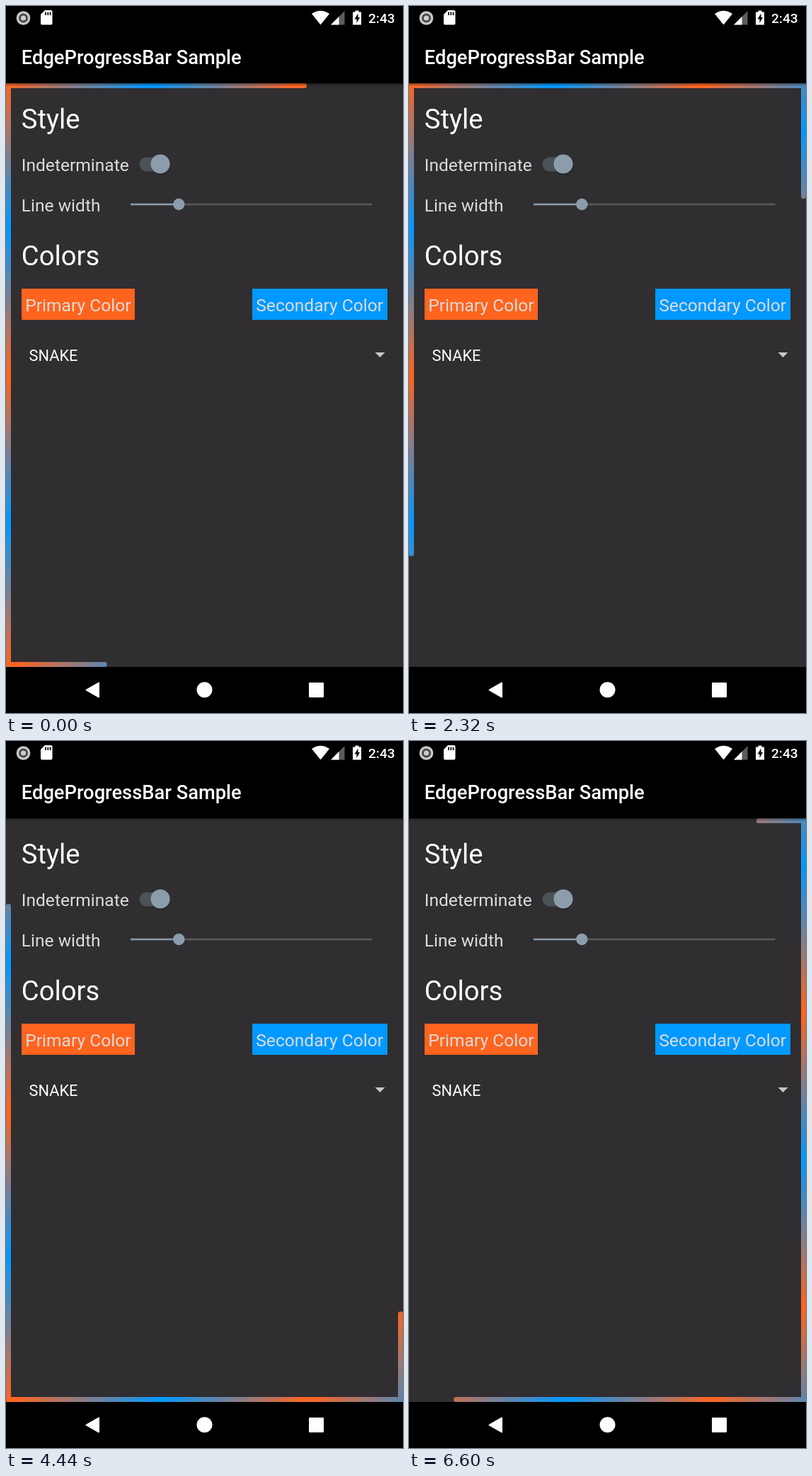
An HTML page that plays this animation: 561 px wide and 998 px high, repeating every 6640 ms.

```html
<!DOCTYPE html>
<html lang="en">
<head>
<meta charset="utf-8">
<title>EdgeProgressBar Sample</title>
<style>
  html, body { margin: 0; width: 100%; height: 100%; overflow: hidden; background: #000; }
  svg { display: block; width: 100%; height: 100%; }
  text { font: 24.55px Roboto, sans-serif; fill: #dcdcdc; }
  .title { font-size: 27.3px; font-weight: 500; fill: #fff; }
  .head { font-size: 38.2px; fill: #fff; }
  .item { font-size: 21.8px; fill: #fff; }
  .clock { font-size: 19.1px; font-weight: 500; fill: #fff; }
</style>
</head>
<body>
<svg viewBox="0 0 561 998">
  <defs>
    <linearGradient id="edge" gradientUnits="userSpaceOnUse" x1="0" y1="109" x2="104" y2="213" spreadMethod="reflect">
      <stop stop-color="#ff641e"/>
      <stop offset="1" stop-color="#0099ff"/>
    </linearGradient>
    <linearGradient id="shade" x2="0" y2="1">
      <stop stop-opacity=".45"/>
      <stop offset="1" stop-opacity="0"/>
    </linearGradient>
  </defs>

  <rect width="561" height="998"/>
  <rect y="109" width="561" height="824" fill="#302e31"/>

  <!-- status bar -->
  <circle cx="24.5" cy="17" r="8.3" fill="#666" stroke="#ccc" stroke-width="3"/>
  <circle cx="24.5" cy="17" r="4.6" fill="#ccc" stroke="#444" stroke-width="2"/>
  <path d="M55 6H63.500Q65.500 6 65.500 8V24.500Q65.500 26.500 63.500 26.500H51Q49 26.500 49 24.500V12Z" fill="#fff"/>
  <path d="M56 8.500V13M59.300 8.500V13M62.600 8.500V13" stroke="#000" stroke-width="1.700"/>
  <path d="M432 11Q444.500 2.500 457 11L444.500 26.500Z" fill="#fff"/>
  <path d="M478.500 7V26.500H459Z" fill="#5c5c5c"/>
  <path d="M470.500 15V26.500H459Z" fill="#fff"/>
  <path d="M493.500 6.500H498.500V8.500H502V26.500H490V8.500H493.500Z" fill="#fff"/>
  <path d="M497.500 10.500L492.500 18.500H495.500V24L500 16H497.500Z"/>
  <text class="clock" x="512" y="24">2:43</text>
  <text class="title" x="21.8" y="81.500">EdgeProgressBar Sample</text>

  <!-- controls -->
  <text class="head" x="21.8" y="172.500">Style</text>
  <text x="21.8" y="233">Indeterminate</text>
  <rect x="188.500" y="213.500" width="42" height="20" rx="10" fill="#4c5255"/>
  <circle cx="218" cy="224.500" r="13.700" opacity=".25"/>
  <circle cx="218" cy="223" r="13.600" fill="#8b9dab"/>
  <text x="21.8" y="290">Line width</text>
  <path d="M244 280H517.500" stroke="#5a595c" stroke-width="2.700"/>
  <path d="M176 280H244" stroke="#8b9dab" stroke-width="2.700"/>
  <circle cx="244.300" cy="280" r="8.200" fill="#8b9dab"/>
  <text class="head" x="21.8" y="366">Colors</text>
  <rect x="22" y="399" width="160" height="44" fill="#ff641e"/>
  <text x="27.300" y="430.500">Primary Color</text>
  <rect x="348" y="399" width="191" height="44" fill="#0099ff"/>
  <text x="353.300" y="430.500">Secondary Color</text>
  <text class="item" x="32.500" y="500.500">SNAKE</text>
  <path d="M521.500 489H535.500L528.500 496Z" fill="#c6c6c6"/>

  <!-- two laps, so the snake can pass the start corner unbroken -->
  <path id="snake" pathLength="2" fill="none" stroke="url(#edge)" stroke-width="7" stroke-linecap="round"
    stroke-dasharray=".5 9" d="M3.500 112.500H557.500V929.500H3.500V112.500H557.500V929.500H3.500V112.500"/>
  <rect y="109" width="561" height="4" fill="url(#shade)"/>

  <!-- navigation bar -->
  <rect y="933" width="561" height="65"/>
  <g fill="#fff" stroke="#fff" stroke-width="2" stroke-linejoin="round">
    <path d="M113.500 965.500L131 955.500V975.500Z"/>
    <circle cx="280.500" cy="965.300" r="10"/>
    <rect x="429" y="956" width="19" height="19"/>
  </g>
</svg>
<script>
  const LOOP = 6640, STEP = 40;
  // [time in ms, clockwise laps of the snake's head from the top left corner]
  const keys = [
    [0, .1525], [240, .1525], [440, .37], [760, .37], [1600, 1.445], [2320, 2.259],
    [3640, 3.988], [3680, 3.988], [4440, 4.956], [5120, 5.4745], [5160, 5.4745], [6600, 7.679]
  ];
  const snake = document.getElementById('snake');

  function headAt(t) {
    const i = Math.max(1, keys.findIndex(k => k[0] >= t));
    const [t0, a] = keys[i - 1], [t1, b] = keys[i];
    return a + (b - a) * (t - t0) / (t1 - t0);
  }

  function draw() {
    const t = Math.floor(performance.now() % LOOP / STEP) * STEP;
    const tail = (headAt(t) + .5) % 1;
    snake.setAttribute('stroke-dashoffset', -tail);
    requestAnimationFrame(draw);
  }
  draw();
</script>
</body>
</html>
```
